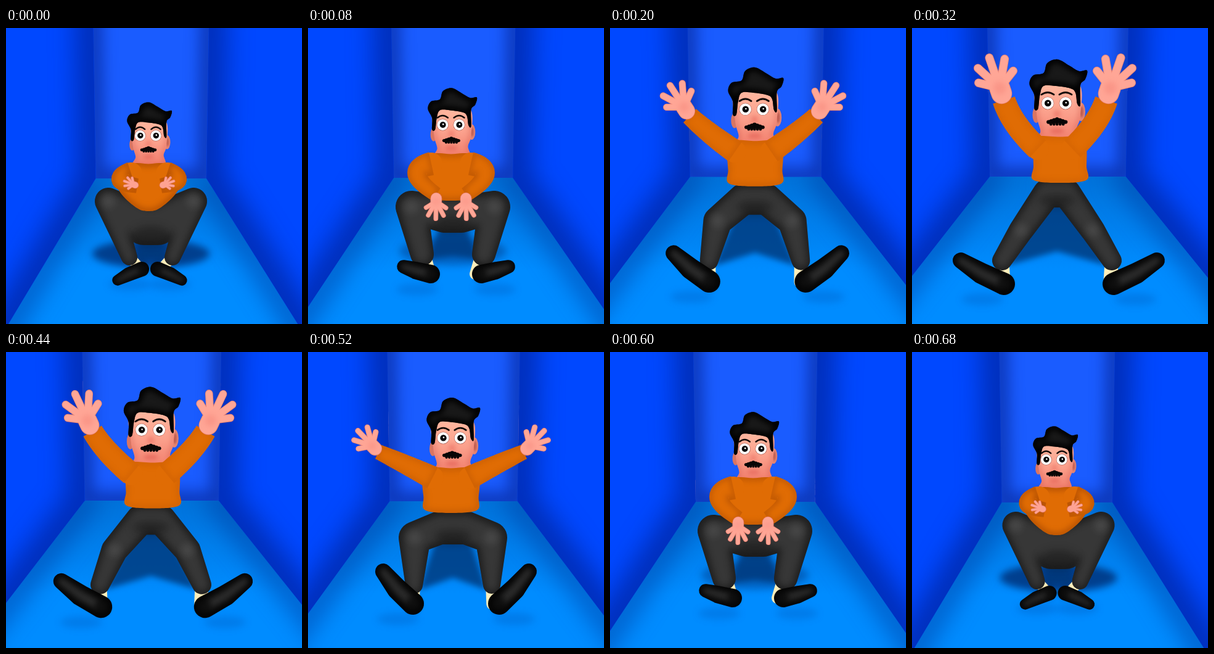
Recreate the animation shown at these times as an HTML page with a canvas. Size 480 by 480 pixels, loop 1000 ms.

```html
<!DOCTYPE html>
<html lang="en">
<head>
<meta charset="utf-8">
<title>Jump in the blue room</title>
<style>
  html, body { margin: 0; width: 100%; height: 100%; overflow: hidden; background: #0048ff; }
  canvas { display: block; width: 480px; height: 480px; }
</style>
</head>
<body>
<canvas id="stage" width="480" height="480"></canvas>
<script>
const ctx = document.getElementById('stage').getContext('2d');

// Left-side joints in four key poses: squat, lift, spread, leap.
const rig = {
  shoulder: [[203, 236], [200, 220], [202, 204], [204, 196]],
  elbow: [[187, 247], [177, 238], [157, 182], [169, 156]],
  wrist: [[213, 256], [208, 270], [114, 162], [149, 117]],
  hand: [[200, 16], [91, 28], [226, 34], [251, 52]],          // angle, length
  hip: [[224, 318, 34], [222, 302, 30], [214, 285, 27], [219, 268, 23]],
  knee: [[166, 281, 22], [168, 290, 26], [173, 301, 26], [177, 328, 20]],
  ankle: [[200, 372, 13], [185, 367, 19], [172, 378, 14], [146, 377, 16]],
  toe: [[181, 409], [155, 387], [122, 356], [79, 377]],
  heel: [[220, 391, 12], [199, 399, 15], [170, 408, 18], [149, 415, 18]],
  torso: [[219, 297, 19, 57, 18], [203, 280, 21, 54, 27], [187, 261, 22, 46, 42], [175, 251, 31, 43, 43]],
  torsoAxis: [[231], [232], [232], [240]],
  footAxis: [[233], [240], [240], [238]]
};
const ARM_AXIS = 232, LEG_AXIS = 235;

let u = 0, pose = {};

const lerp = (a, b, k) => a + (b - a) * k;

function setPose(value) {
  u = value;
  const i = Math.min(2, Math.floor(u));
  for (const name in rig) {
    const [a, b] = [rig[name][i], rig[name][i + 1]];
    pose[name] = a.map((v, j) => lerp(v, b[j], u - i));
  }
}

const flip = (pts, ax) => pts.map(([x, ...rest]) => [2 * ax - x, ...rest]);
const sides = (pts, ax) => [pts, flip(pts, ax)];

function smooth(pts) {
  const path = new Path2D(), n = pts.length, at = i => pts[(i + n) % n];
  path.moveTo(...pts[0]);
  for (let i = 0; i < n; i++) {
    const [a, b, c, d] = [at(i - 1), at(i), at(i + 1), at(i + 2)];
    path.bezierCurveTo(b[0] + (c[0] - a[0]) / 6, b[1] + (c[1] - a[1]) / 6,
      c[0] - (d[0] - b[0]) / 6, c[1] - (d[1] - b[1]) / 6, c[0], c[1]);
  }
  path.closePath();
  return path;
}

function poly(pts, closed = true) {
  const path = new Path2D();
  pts.forEach(p => path.lineTo(...p));
  if (closed) path.closePath();
  return path;
}

// Chains of circles [x, y, r] joined by their outer tangents.
function chains(list, scale = 1) {
  const path = new Path2D();
  for (const chain of list) {
    for (let i = 1; i < chain.length; i++) {
      const [ax, ay, ar] = chain[i - 1], [bx, by, br] = chain[i];
      const turn = Math.atan2(by - ay, bx - ax);
      const ratio = (ar - br) * scale / Math.hypot(bx - ax, by - ay);
      const open = Math.acos(Math.max(-1, Math.min(1, ratio)));
      const part = new Path2D();
      part.arc(ax, ay, ar * scale, turn + open, turn - open + 2 * Math.PI);
      part.arc(bx, by, br * scale, turn - open, turn + open);
      part.closePath();
      path.addPath(part);
    }
  }
  return path;
}

// Dark limbs with a soft lighter core.
function airbrush(list, dark, light, core, blur) {
  const path = chains(list);
  ctx.fillStyle = dark;
  ctx.fill(path);
  ctx.save();
  ctx.clip(path);
  ctx.filter = `blur(${blur}px)`;
  ctx.fillStyle = light;
  ctx.fill(chains(list, core));
  ctx.restore();
}

// Fill a shape and darken it softly along a line inside it.
function paint(path, fill, edge, width, blur, line = path) {
  ctx.fillStyle = fill;
  ctx.fill(path);
  ctx.save();
  ctx.clip(path);
  ctx.filter = `blur(${blur}px)`;
  ctx.strokeStyle = edge;
  ctx.lineWidth = width;
  ctx.stroke(line);
  ctx.restore();
}

function blob(x, y, rx, ry, color, blur = 0) {
  ctx.save();
  if (blur) ctx.filter = `blur(${blur}px)`;
  ctx.fillStyle = color;
  ctx.beginPath();
  ctx.ellipse(x, y, rx, ry, 0, 0, 7);
  ctx.fill();
  ctx.restore();
}

function stroke(pts, color, width) {
  ctx.strokeStyle = color;
  ctx.lineWidth = width;
  ctx.lineCap = 'round';
  ctx.stroke(poly(pts, false));
}

function vertical(y0, y1, ...colors) {
  const g = ctx.createLinearGradient(0, y0, 0, y1);
  colors.forEach((c, i) => g.addColorStop(i / (colors.length - 1), c));
  return g;
}

function drawRoom() {
  const l = 140.5 - 6.5 * u, r = 330 + 7.3 * u, y = 244 - u;
  const edge = 484 - 37 * u + 3 * u * u;
  const bl = [l + 5, y], br = [r - 5, y], tl = [l, -60], tr = [r, -60];
  const far = edge + 60 * (edge - y) / l;
  const fl = [-60, far], fr = [540, far];
  const dark = 'rgba(0,25,125,.55)';
  paint(poly([tl, tr, br, bl]), '#1a5cff', dark, 28, 12, poly([tl, bl, br, tr], false));
  const sideLines = poly([fl, bl], false);
  sideLines.addPath(poly([fr, br], false));
  paint(poly([bl, br, fr, [540, 600], [-60, 600], fl]), vertical(y, y + 150, '#0072da', '#008cff'),
    'rgba(0,60,160,.5)', 46, 18, sideLines);
  for (const wall of [[tl, bl, fl, [-60, -60]], [tr, br, fr, [540, -60]]]) {
    paint(poly(wall), '#0048ff', dark, 58, 21, poly(wall.slice(0, 3), false));
  }
}

function drawShadows() {
  const { hip, ankle, heel, toe, footAxis } = pose;
  blob(LEG_AXIS, 366 - 4 * u, 95 - 8 * u, 23, `rgba(0,45,115,${Math.max(0, .8 - .4 * u)})`, 6);
  const feet = sides([[ankle[0] + 8, ankle[1] + 8]], LEG_AXIS).flat();
  ctx.save();
  ctx.filter = 'blur(5px)';
  ctx.fillStyle = 'rgba(0,55,120,.8)';
  ctx.fill(poly([[hip[0], hip[1]], feet[0], [LEG_AXIS, 374 - 4 * u], feet[1], [2 * LEG_AXIS - hip[0], hip[1]]]));
  ctx.restore();
  for (const [[x, y]] of sides([[(toe[0] + heel[0]) / 2, heel[1] + 25]], footAxis[0])) {
    blob(x, y, 34, 10, 'rgba(0,60,150,.2)', 6);
  }
}

function drawHead() {
  const sx = .77 + .075 * u, sy = .76 + .08 * u;
  const hx = 231 + 1.4 * u, hy = 196.5 - 15.2 * u;
  const place = pts => smooth(pts.map(([x, y]) => [hx + x * sx, hy + y * sy]));
  const dot = (x, y, rx, ry, c, blur) => blob(hx + x * sx, hy + y * sy, rx * sx, ry * sy, c, blur);

  dot(-34, -10, 6, 13, '#d97563');
  dot(39, -15, 7, 15, '#e58472');
  dot(40, -15, 3, 9, '#bd5c50', 1.5);
  const skin = vertical(hy - 60 * sy, hy + 32 * sy, '#ffb8a0', '#fba08c', '#f2806e');
  paint(place([[-32, -62], [-33, -10], [-27, 16], [-30, 34], [32, 34], [32, 12], [38, -10], [34, -62]]),
    skin, 'rgba(200,70,60,.35)', 7, 4);
  dot(0, -12, 6, 6, 'rgba(225,85,75,.4)', 3);
  dot(0, 16, 12, 4, 'rgba(215,70,65,.45)', 3);
  const hair = place([[-37, -20], [-37, -42], [-45, -60], [-39, -74], [-22, -78], [-16, -94], [1, -100],
    [20, -90], [36, -81], [49, -82], [46, -68], [38, -58], [38, -26], [33, -28], [30, -46], [22, -53],
    [-2, -57], [-22, -57], [-28, -42], [-31, -20]]);
  paint(hair, '#191919', '#000', 12, 5);

  const k = Math.sqrt(sx), r = 9.8 * k, ey = hy - 29 * sy;
  for (const s of [-1, 1]) {
    const ex = hx - .7 + s * 14.5 * k;
    blob(ex, ey, r + .5, r + .5, '#a3564a');
    blob(ex, ey, r, r, '#fff');
    blob(ex + .3, ey, r * .55, r * .55, '#050505');
    blob(ex + .8, ey - .8, 1.3, 1.3, '#fff');
    const by = ey - 16 * sy;
    ctx.lineWidth = 3 * sx;
    ctx.lineCap = 'round';
    ctx.strokeStyle = '#100a08';
    ctx.beginPath();
    ctx.moveTo(ex - 10 * sx, by + 2);
    ctx.quadraticCurveTo(ex, by - 5, ex + 10 * sx, by + 2);
    ctx.stroke();
  }
  for (let i = -3; i <= 3; i++) {
    const out = Math.abs(i);
    dot(i * 4.4, out - 1.5, 4, 4.6 - out * .5, '#080606');
    if (out < 3) dot(i * 5, 4, 2.5, 3.4, '#080606');
  }
}

// Tapered bent tube through three points.
function tube([a, b, c], widths) {
  const m = [0, 1].map(i => 2 * b[i] - (a[i] + c[i]) / 2);
  const up = [], down = [];
  for (let i = 0; i <= 20; i++) {
    const t = i / 20, q = 1 - t;
    const [x, y] = [0, 1].map(k => q * q * a[k] + 2 * q * t * m[k] + t * t * c[k]);
    const [dx, dy] = [0, 1].map(k => lerp(m[k] - a[k], c[k] - m[k], t));
    const d = lerp(widths[0], widths[1], t) / (Math.hypot(dx, dy) || 1);
    up.push([x - dy * d, y + dx * d]);
    down.unshift([x + dy * d, y - dx * d]);
  }
  return poly(up.concat(down));
}

function drawLegs() {
  const { hip, knee, ankle, toe, heel, footAxis } = pose;
  const shrink = (p, k) => [p[0], p[1], p[2] * k];
  const socks = [shrink(ankle, .7), shrink(heel, .6)];
  ctx.fillStyle = '#fff0bd';
  ctx.fill(chains(sides(socks, LEG_AXIS)));

  const hips = [hip, ...flip([hip], LEG_AXIS)];
  airbrush([hips, ...sides([hip, knee, ankle], LEG_AXIS)], '#1d1d1d', '#373737', .74, 6);
  blob(LEG_AXIS, hip[1] + hip[2] * .5, 30, hip[2] * .4, 'rgba(10,10,10,.4)', 7);
  for (const [[x, y]] of sides([knee], LEG_AXIS)) blob(x, y, 11, 11, 'rgba(255,255,255,.08)', 6);

  const r = heel[2];
  const ball = [lerp(toe[0], heel[0], .48), lerp(toe[1], heel[1], .55), r * .95];
  for (const foot of sides([[...toe, r * .72], ball, heel], footAxis[0])) {
    airbrush([foot], '#050505', '#2b2b2b', .45, 5);
    blob(foot[2][0], foot[2][1], r * .6, r * .7, 'rgba(0,0,0,.6)', 4);
  }
}

function drawTorso(edge) {
  const [top, hem, neck, chest, waist] = pose.torso, ax = pose.torsoAxis[0];
  const row = (half, t) => [ax - half, lerp(top, hem, t)];
  const left = [row(neck, 0), row((neck + chest) / 2, .04), row(chest, .28),
    row(lerp(chest, waist, .35), .65), row(waist, .94)];
  const path = smooth([row(0, .02), ...left, row(0, 1), ...flip(left, ax).reverse()]);
  paint(path, '#e06c04', edge, 9, 5);
}

function drawHand(wrist, angle, length) {
  const reach = (p, a, d) => [p[0] + Math.cos(a) * d, p[1] + Math.sin(a) * d];
  const base = reach(wrist, angle, length * .22), palm = reach(wrist, angle, length * .4);
  for (const [color, grow] of [['#e87f70', .8], ['#ffa696', -.8]]) {
    for (let i = -2; i <= 2; i++) {
      const tip = reach(palm, angle + i * .5, length * (1 - .08 * i * i));
      stroke([palm, tip], color, length * .25 + grow);
    }
    stroke([base, palm], color, length * .64 + grow);
  }
  blob(...palm, length * .2, length * .2, 'rgba(240,120,110,.35)', 4);
}

function drawArms(edge) {
  const { shoulder, elbow, wrist, hand } = pose;
  const angle = hand[0] * Math.PI / 180, cuff = Math.max(12, hand[1] * .36);
  for (const arm of sides([shoulder, elbow, wrist], ARM_AXIS)) {
    blob(...arm[0], 18, 18, '#e06c04');
    paint(tube(arm, [19, cuff]), '#e06c04', edge, 7, 4);
    drawHand(arm[2], arm[2][0] < ARM_AXIS ? angle : Math.PI - angle, hand[1]);
  }
}

function shifted(dx, draw) {
  ctx.save();
  ctx.translate(dx, 0);
  draw();
  ctx.restore();
}

// Linear at first, then easing into the top of the jump; the way back mirrors it.
function jump(step) {
  const k = Math.min(step, 17 - step);
  return k < 4 ? k / 2 : 3 - (8 - k) ** 2 / 16;
}

let last = -1;

function frame(now) {
  const step = Math.min(17, Math.floor(now % 1000 / 40));
  if (step !== last) {
    last = step;
    setPose(jump(step));
    const dx = step > 8 ? 2.5 * Math.max(0, 1 - u) : 0;
    const edge = `rgba(140,55,0,${.5 - .12 * u})`;
    drawRoom();
    shifted(dx, drawShadows);
    drawHead();
    shifted(dx, () => {
      drawLegs();
      drawTorso(edge);
      drawArms(edge);
    });
  }
  requestAnimationFrame(frame);
}

frame(0);
</script>
</body>
</html>
```
